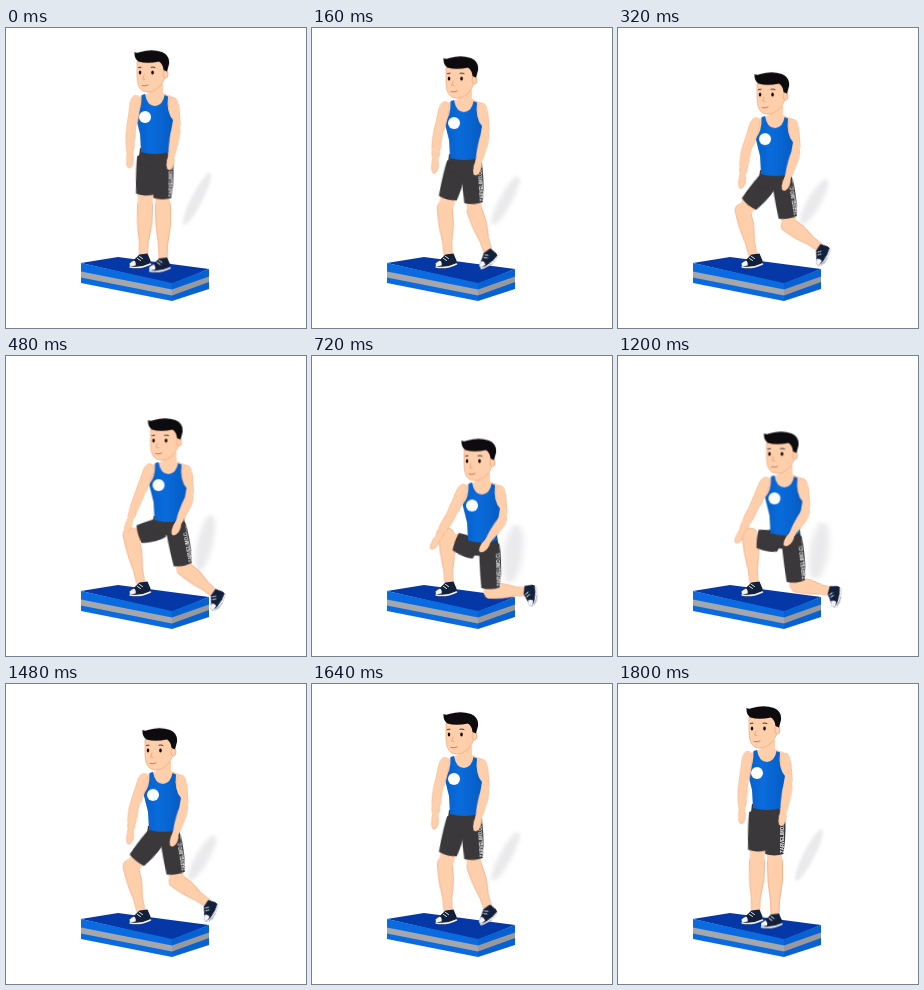
These frames come from a looping animation (300 px wide and 300 px high, 2.04 s). An HTML page without scripts:

```html
<!DOCTYPE html>
<html lang="en">
<head>
<meta charset="utf-8">
<title>Step-back lunge</title>
<style>
html, body { margin: 0; width: 100%; height: 100%; overflow: hidden; background: #fff; }
svg { display: block; width: 100vw; height: 100vh; }

.skin { fill: #ffceab; }
.edge { stroke: #f0a67d; stroke-width: .7; }
.arm-l, .arm-r { filter: drop-shadow(0 0 .5px #e58d5c); }
.shorts { fill: #3a383a; }
.ink { fill: #0d0b0d; }
.line { fill: none; stroke: #151316; stroke-linecap: round; }
.label { font: bold 4.7px "Liberation Sans", Arial, sans-serif; fill: #fff; }

/* Down until 880 ms, hold until 1000 ms, back up until 1800 ms, rest */
.body, .thigh-l, .thigh-r, .shin-l, .shin-r, .shoe-r,
.arm-l, .arm-r, .fore-l, .fore-r, .shade { animation: 2040ms linear infinite; }
.body { animation-name: body; }
.thigh-l { animation-name: thigh-l; }
.thigh-r { animation-name: thigh-r; }
.shin-l { animation-name: shin-l; }
.shin-r { animation-name: shin-r; }
.shoe-r { animation-name: shoe-r; }
.arm-l { animation-name: arm-l; }
.arm-r { animation-name: arm-r; }
.fore-l { animation-name: fore-l; }
.fore-r { animation-name: fore-r; }
.shade { animation-name: shade; }

@keyframes body {
  0%, 88.235%, 100% { transform: translate(0, 0); }
  7.843%, 80.392% { transform: translate(3px, 6px); }
  11.765%, 76.471% { transform: translate(5px, 13px); }
  15.686%, 72.549% { transform: translate(8px, 22px); }
  23.529%, 64.706% { transform: translate(13.5px, 40px); }
  29.412%, 58.824% { transform: translate(17.5px, 53.5px); }
  35.294%, 52.941% { transform: translate(21px, 60.5px); }
  43.137%, 49.02% { transform: translate(22px, 63px); }
}
@keyframes thigh-l {
  0%, 88.235%, 100% { transform: translate(141px, 132px) rotate(2.4deg) scale(1, .98); }
  7.843%, 80.392% { transform: translate(141px, 132px) rotate(13.7deg) scale(1, .95); }
  11.765%, 76.471% { transform: translate(141px, 132px) rotate(25deg) scale(1, .9); }
  15.686%, 72.549% { transform: translate(141px, 132px) rotate(38.7deg) scale(1, .82); }
  23.529%, 64.706% { transform: translate(141px, 132px) rotate(73deg) scale(1, .64); }
  29.412%, 58.824% { transform: translate(141px, 132px) rotate(97deg) scale(1, .54); }
  35.294%, 52.941% { transform: translate(141px, 132px) rotate(110deg) scale(1, .56); }
  43.137%, 49.02% { transform: translate(141px, 132px) rotate(114deg) scale(1, .57); }
}
@keyframes thigh-r {
  0%, 88.235%, 100% { transform: translate(156.5px, 132px) rotate(0deg) scale(1, .95); }
  7.843%, 80.392% { transform: translate(156.5px, 132px) rotate(-3.6deg) scale(1, .92); }
  11.765%, 76.471% { transform: translate(156.5px, 132px) rotate(-6.3deg) scale(1, .9); }
  15.686%, 72.549% { transform: translate(156.5px, 132px) rotate(-9deg) scale(1, .89); }
  23.529%, 64.706% { transform: translate(156.5px, 132px) rotate(-11deg) scale(1, .93); }
  29.412%, 58.824% { transform: translate(156.5px, 132px) rotate(-6deg) scale(1, 1); }
  35.294%, 52.941% { transform: translate(156.5px, 132px) rotate(-2deg) scale(1, .98); }
  43.137%, 49.02% { transform: translate(156.5px, 132px) rotate(-1deg) scale(1, .96); }
}
@keyframes shin-l {
  0%, 88.235%, 100% { transform: translate(139px, 180px) rotate(2deg); }
  7.843%, 80.392% { transform: translate(133px, 182px) rotate(-4deg) scale(1, .96); }
  11.765%, 76.471% { transform: translate(128px, 184px) rotate(-9deg) scale(1, .94); }
  15.686%, 72.549% { transform: translate(125px, 184px) rotate(-13deg) scale(1, .94); }
  23.529%, 64.706% { transform: translate(125px, 181px) rotate(-12deg); }
  29.412%, 58.824% { transform: translate(132px, 181px) rotate(-5deg) scale(1, .98); }
  35.294%, 52.941% { transform: translate(134.5px, 181px) rotate(-3deg) scale(1, .98); }
  43.137%, 49.02% { transform: translate(135.5px, 181.5px) rotate(-2deg) scale(1, .97); }
}
@keyframes shin-r {
  0%, 88.235%, 100% { transform: translate(157px, 181px) rotate(0deg) scale(1, 1.06); }
  7.843%, 80.392% { transform: translate(163px, 184px) rotate(-18deg) scale(1, .88); }
  11.765%, 76.471% { transform: translate(167px, 190px) rotate(-36deg) scale(1, .8); }
  15.686%, 72.549% { transform: translate(171px, 197px) rotate(-54deg) scale(1, .8); }
  23.529%, 64.706% { transform: translate(179px, 213px) rotate(-50deg) scale(1, .81); }
  29.412%, 58.824% { transform: translate(180px, 229px) rotate(-79deg) scale(1, .72); }
  35.294%, 52.941% { transform: translate(179px, 235px) rotate(-89deg) scale(1, .74); }
  43.137%, 49.02% { transform: translate(179px, 236px) rotate(-90deg) scale(1, .75); }
}
@keyframes shoe-r {
  0%, 88.235%, 100% { transform: translate(157px, 232.5px) rotate(0deg); }
  7.843%, 80.392% { transform: translate(176px, 225px) rotate(-28deg); }
  11.765%, 76.471% { transform: translate(189px, 221px) rotate(-42deg); }
  15.686%, 72.549% { transform: translate(202px, 221px) rotate(-50deg); }
  23.529%, 64.706% { transform: translate(209px, 238px) rotate(-47deg); }
  29.412%, 58.824% { transform: translate(213px, 235px) rotate(-68deg); }
  35.294%, 52.941% { transform: translate(214.5px, 234.5px) rotate(-75deg); }
  43.137%, 49.02% { transform: translate(215px, 235px) rotate(-77deg); }
}
@keyframes arm-l {
  0%, 88.235%, 100% { transform: translate(129px, 73px) rotate(8deg); }
  15.686%, 72.549% { transform: translate(129px, 73px) rotate(18deg); }
  23.529%, 64.706% { transform: translate(129px, 73px) rotate(20deg); }
  29.412%, 58.824% { transform: translate(129px, 73px) rotate(23deg); }
  43.137%, 49.02% { transform: translate(129px, 73px) rotate(24deg); }
}
@keyframes fore-l {
  0%, 88.235%, 100% { transform: translate(0, 29px) rotate(-5.5deg); }
  15.686%, 72.549% { transform: translate(0, 29px) rotate(-10deg); }
  23.529%, 64.706% { transform: translate(0, 29px) rotate(0deg); }
  29.412%, 58.824% { transform: translate(0, 29px) rotate(4deg); }
  43.137%, 49.02% { transform: translate(0, 29px) rotate(11deg); }
}
@keyframes arm-r {
  0%, 88.235%, 100% { transform: translate(167px, 75px) rotate(-5deg); }
  23.529%, 64.706% { transform: translate(167px, 75px) rotate(-4deg); }
  29.412%, 58.824% { transform: translate(167px, 75px) rotate(-5deg); }
  43.137%, 49.02% { transform: translate(167px, 75px) rotate(-3deg); }
}
@keyframes fore-r {
  0%, 88.235%, 100% { transform: translate(0, 29px) rotate(15deg); }
  15.686%, 72.549% { transform: translate(0, 29px) rotate(22deg); }
  23.529%, 64.706% { transform: translate(0, 29px) rotate(28deg); }
  29.412%, 58.824% { transform: translate(0, 29px) rotate(37deg); }
  43.137%, 49.02% { transform: translate(0, 29px) rotate(42deg); }
}
@keyframes shade {
  0%, 88.235%, 100% { transform: translate(191px, 171px) rotate(27deg); }
  15.686%, 72.549% { transform: translate(196px, 174px) rotate(30deg) scale(1.2, .9); }
  23.529%, 64.706% { transform: translate(199px, 187px) rotate(13deg) scale(1.4, 1); }
  29.412%, 58.824% { transform: translate(201px, 195px) rotate(9deg) scale(1.7, 1); }
  43.137%, 49.02% { transform: translate(201px, 201px) rotate(6deg) scale(1.8, 1.05); }
}
</style>
</head>
<body>
<svg viewBox="0 0 300 300">
  <defs>
    <filter id="soft" x="-100%" y="-30%" width="300%" height="160%"><feGaussianBlur stdDeviation="1.8"/></filter>
    <linearGradient id="cloth">
      <stop offset="0" stop-color="#065fc9"/>
      <stop offset=".4" stop-color="#0a6cdc"/>
      <stop offset="1" stop-color="#055cc4"/>
    </linearGradient>
    <path id="shin" class="skin edge" d="M-7.5 -3Q-7 -9 0 -9Q7 -9 7.5 -3Q9 16 4.5 34L4 49H-4L-4.5 34Q-8 16 -7.5 -3Z"/>
    <path id="thigh" class="skin" d="M-8.5 20L-7.2 46Q0 52 7.2 46L8.5 20Z"/>
    <path id="leg" class="shorts" d="M-10 -4Q0 -10 10 -4Q12.5 14 9 38Q0 41 -9.5 38Q-11 14 -10 -4Z"/>
    <path id="upper" class="skin" d="M-4.5 2Q-4 -6 1 -6Q5 -5 5.5 4Q6.500 18 4.300 30H-4.300Q-5.500 16 -4.500 2Z"/>
    <path id="fore" class="skin" d="M-4.300 0Q0 -4 4.300 0Q4.800 14 2.800 25Q4.500 31 3 35Q1 40 -1.500 37.500Q-4 34 -2.800 25Q-5.300 12 -4.300 0Z"/>
    <g id="shoe">
      <path d="M-14 7Q-10 4 -4 -2L4 -3L7 4V8Q-2 13 -10 12Q-15 11 -14 7Z" fill="#13203c"/>
      <path d="M-14 7Q-12 5 -9.500 4Q-7 6 -8 9L-13.500 10Z" fill="#f3f4f7"/>
      <path class="line" d="M-13.500 10.500Q-3 12.500 7 7.500" style="stroke:#eef0f4;stroke-width:1.500"/>
      <path class="line" d="M-6 2L-3 4M-4 0L-1 2" style="stroke:#fff;stroke-width:.9"/>
    </g>
  </defs>

  <ellipse class="shade" rx="5.500" ry="29" fill="#8b8b96" opacity=".18" filter="url(#soft)"/>

  <g id="platform">
    <path d="M75 235L112 229L203 241L166 256Z" fill="#0637a6"/>
    <path d="M75 235L166 255V273L75 255Z" fill="#0a6ae0"/>
    <path d="M166 255L203 241V261L166 273Z" fill="#0861d2"/>
    <path d="M75 243.500L166 261.500V267.500L75 249.500Z" fill="#a6a7aa"/>
    <path d="M166 261.500L203 248.500V254L166 267.500Z" fill="#98999d"/>
  </g>

  <use href="#shin" class="shin-r"/>
  <use href="#shoe" class="shoe-r"/>
  <use href="#shin" class="shin-l"/>
  <use href="#shoe" x="137.500" y="228.500"/>

  <g class="body">
    <g class="thigh-r">
      <use href="#thigh"/>
      <use href="#leg" transform="scale(1 1.05)"/>
      <text class="label" transform="translate(9.500 39) rotate(-90)">ZARVELIMO.COM</text>
    </g>
    <g class="thigh-l">
      <use href="#thigh"/>
      <use href="#leg" transform="scale(1 .92)"/>
    </g>
    <path class="shorts" d="M134 120H164L167 136Q150 143 132 136Z"/>

    <path class="skin" d="M143 56H157V65Q164 67 170 71L165 90H131L126 71Q136 68 143 65Z"/>
    <g class="arm-r">
      <use href="#upper"/>
      <use href="#fore" class="fore-r"/>
    </g>
    <path d="M135.500 67L139 66Q141 78 149 78Q157 77 158.500 67L162 68.500Q160 84 167 92L164.500 106L164 124Q149 128 135 124L134 106L129.500 88Q136 82 135.500 67Z" fill="url(#cloth)"/>
    <!-- Forearm crosses in front of the shirt hem -->
    <g class="arm-r" style="filter:none"><use href="#fore" class="fore-r"/></g>
    <circle cx="139" cy="89" r="6" fill="#fff"/>

    <g class="arm-l">
      <use href="#upper"/>
      <use href="#fore" class="fore-l"/>
    </g>

    <g id="head">
      <path class="skin edge" d="M131 33V48Q131 60 137 63Q146 67 155 57L160.500 47L159 33Z"/>
      <ellipse class="skin edge" cx="159.500" cy="46" rx="2.500" ry="4"/>
      <path class="ink" d="M128.500 24Q131 25.500 134 24Q146 20.500 156 24Q164 27.500 163 36L161 43.500L157.500 42Q157 36 153 33.500Q141 36 132.500 33.500Q128 31 128.500 24Z"/>
      <ellipse class="ink" cx="134" cy="44.500" rx="1.200" ry="1.900"/>
      <ellipse class="ink" cx="146.500" cy="44.500" rx="1.300" ry="2"/>
      <path class="line" d="M132.500 39.500L135 39.200M145 39.200Q147 38.500 149 39.500" style="stroke-width:.8"/>
      <path class="line" d="M138 47L136.500 51L139 51.500" style="stroke:#ee9d72;stroke-width:.8"/>
      <path class="line" d="M136 57.500Q139 58.500 142 57" style="stroke:#c9714f;stroke-width:.9"/>
    </g>
  </g>
</svg>
</body>
</html>
```
